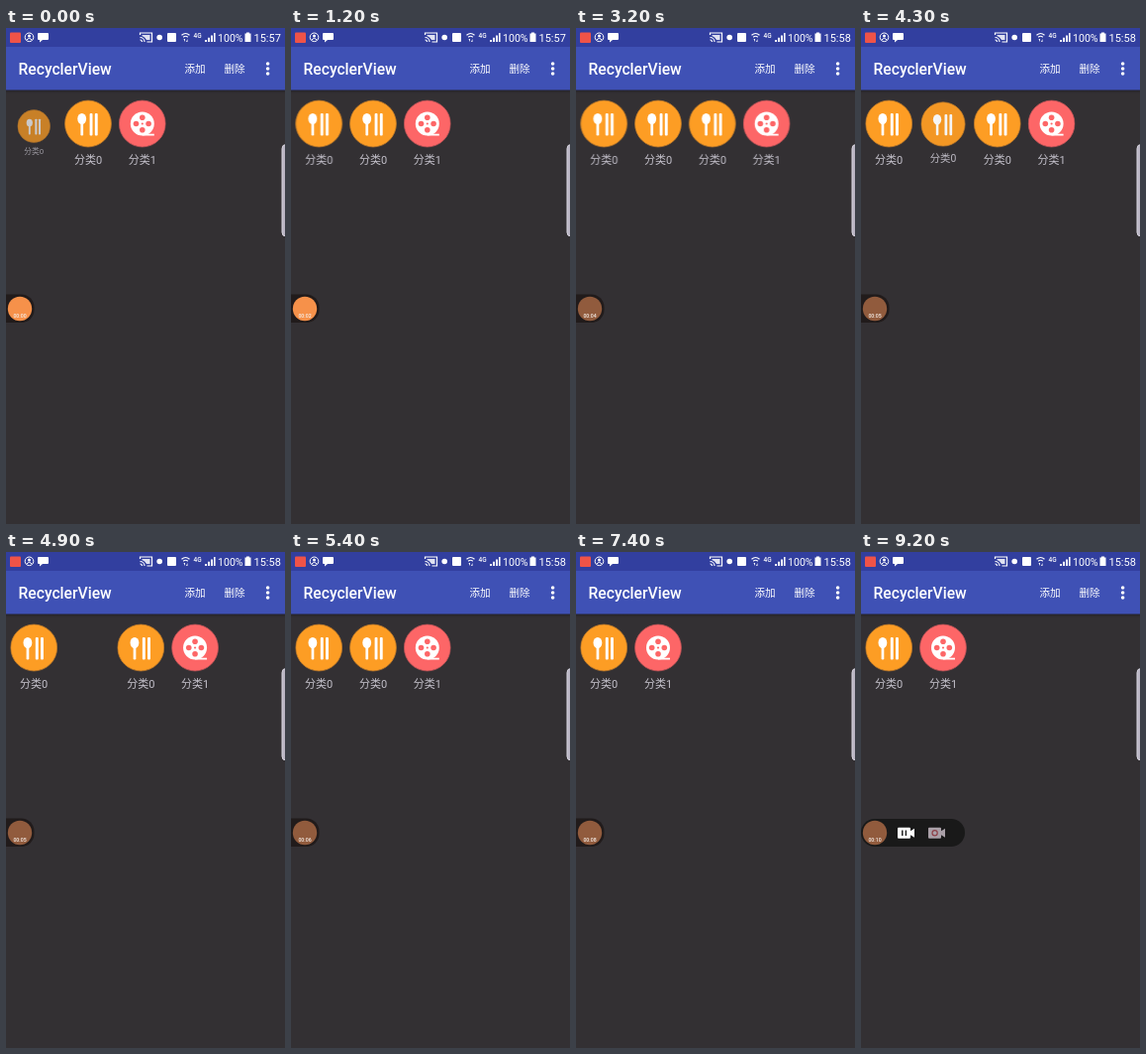
Recreate the animation shown at these times as an HTML page. Size 282x500 px, loop 9.3 s.

```html
<!DOCTYPE html>
<html lang="zh">
<head>
<meta charset="utf-8">
<title>RecyclerView</title>
<style>
  html, body { margin: 0; width: 100%; height: 100%; overflow: hidden; background: #333033; }
  svg { display: block; width: 100vw; height: 100vh; font-family: Roboto, "Noto Sans CJK SC", "Noto Sans CJK", sans-serif; }

  .anim { animation: 9300ms cubic-bezier(.37, 0, .63, 1) infinite; }
  .cut { animation: 9300ms step-end infinite; }
  .label { font-size: 11px; fill: #c4c1cb; text-anchor: middle; }

  /* Horizontal moves: one cell is 54.8 wide */
  .first { animation-name: first-move; }
  .second { animation-name: second-move; }
  .film { animation-name: film-move; }
  @keyframes first-move {
    0%, 22.69% { transform: translateX(0); }
    28.06%, 100% { transform: translateX(54.8px); }
  }
  @keyframes second-move {
    0%, 22.69% { transform: translateX(54.8px); }
    28.06%, 52.12% { transform: translateX(109.6px); }
    57.49%, 100% { transform: translateX(54.8px); }
  }
  @keyframes film-move {
    0%, 22.69% { transform: translateX(109.6px); }
    28.06%, 52.12% { transform: translateX(164.4px); }
    57.49%, 73.62% { transform: translateX(109.6px); }
    79%, 100% { transform: translateX(54.8px); }
  }

  /* Items growing in and shrinking away */
  .first-pop { animation-name: first-pop; }
  .second-pop { animation-name: second-pop; }
  .added-pop { animation-name: added-pop; }
  @keyframes first-pop {
    0% { transform: scale(.7); opacity: .74; animation-timing-function: ease-out; }
    2.04%, 45.4% { transform: scale(1); opacity: 1; }
    51%, 100% { transform: scale(0); opacity: .2; }
  }
  @keyframes second-pop {
    0%, 66.9% { transform: scale(1); opacity: 1; }
    72.5%, 100% { transform: scale(0); opacity: .2; }
  }
  @keyframes added-pop {
    0%, 28.28% { transform: scale(0); opacity: .2; }
    33.87%, 100% { transform: scale(1); opacity: 1; }
  }

  .dim { animation-name: dim; }
  .open { animation-name: open; }
  .closed { animation-name: closed; }
  @keyframes dim { 0% { fill: #f6914a; } 33.3%, 100% { fill: #915b3d; } }
  @keyframes open { 0% { opacity: 0; } 96.7%, 100% { opacity: 1; } }
  @keyframes closed { 0% { opacity: 1; } 96.7%, 100% { opacity: 0; } }
</style>
</head>
<body>
<svg viewBox="0 0 282 500" preserveAspectRatio="none">
  <defs>
    <linearGradient id="shade" x2="0" y2="1">
      <stop stop-color="#232128"/>
      <stop offset="1" stop-color="#333033"/>
    </linearGradient>
    <g id="food">
      <circle cy="-8.5" r="23.4" fill="#fd9d24" stroke="#c07c2a" stroke-width=".8"/>
      <g fill="#fff">
        <ellipse cx="-6.3" cy="-13.5" rx="4.4" ry="5.5"/>
        <rect x="-7.6" y="-10" width="2.7" height="13.5" rx="1.2"/>
        <rect x="1.6" y="-19" width="2.9" height="22.5" rx="1"/>
        <rect x="6.8" y="-19" width="2.9" height="22.5" rx="1"/>
      </g>
      <text class="label" y="32">分类0</text>
    </g>
    <g id="movie">
      <circle cy="-8.5" r="23.4" fill="#fd6667" stroke="#c05558" stroke-width=".8"/>
      <circle cy="-8.5" r="12" fill="#fff"/>
      <path d="M0 2.6H12" stroke="#fff" stroke-width="1.8"/>
      <g fill="#fd6667">
        <circle cy="-14.8" r="2.8"/>
        <circle cx="6.3" cy="-8.5" r="2.8"/>
        <circle cy="-2.2" r="2.8"/>
        <circle cx="-6.3" cy="-8.5" r="2.8"/>
        <circle cy="-8.5" r="1.1"/>
      </g>
      <text class="label" y="32">分类1</text>
    </g>
    <path id="camera" d="M1 0H12a1 1 0 0 1 1 1V3.5L17 1V10L13 7.5V10a1 1 0 0 1-1 1H1a1 1 0 0 1-1-1V1a1 1 0 0 1 1-1z"/>
  </defs>

  <rect width="282" height="500" fill="#333033"/>
  <rect y="62" width="282" height="4" fill="url(#shade)"/>
  <rect y="18" width="282" height="44.5" fill="#3f51b5"/>
  <rect width="282" height="19" fill="#323f9f"/>

  <!-- Status bar -->
  <rect x="4" y="4.5" width="11" height="10.5" rx="1" fill="#ef5348"/>
  <g fill="none" stroke="#fff">
    <circle cx="23.5" cy="9.3" r="4.3"/>
    <path d="M20.8 12.3Q23.5 8.5 26.2 12.3"/>
    <path d="M135.5 7V5H147.5V14H142.5M135.5 9.5a4.5 4.5 0 0 1 4.5 4.5M135.5 12a2 2 0 0 1 2 2" stroke-width="1.2"/>
    <path d="M177.5 7.2Q181.5 3.8 185.5 7.2M179.2 9.2Q181.5 7.3 183.8 9.2" stroke-width="1.2"/>
  </g>
  <g fill="#fff">
    <circle cx="23.5" cy="8" r="1.5"/>
    <path d="M33 5H42a1 1 0 0 1 1 1V11a1 1 0 0 1-1 1H37L34 14.5V12H33a1 1 0 0 1-1-1V6a1 1 0 0 1 1-1z"/>
    <path d="M137.5 7H145.5V12H142Q140.5 9 137.5 8z" opacity=".85"/>
    <circle cx="155.2" cy="9.5" r="2.8"/>
    <rect x="163" y="5" width="9" height="9" rx="1"/>
    <path d="M179.5 11H181V14zM182 14L183.5 11V14z"/>
    <path d="M201 12H203V14H201zM204 9.8H206V14H204zM207 7.4H209V14H207zM210 5H211.6V14H210z"/>
    <path d="M243 4.5H246V5.5H247.5V14H241.5V5.5H243z"/>
    <text x="189.5" y="9.5" font-size="6.5" font-weight="500">4G</text>
    <text x="214" y="13.5" font-size="10.6">100%</text>
    <text id="clock" x="250.5" y="13.5" font-size="11">15:57</text>
  </g>

  <!-- App bar -->
  <g fill="#fff">
    <text x="12.5" y="46.8" font-size="15.67" font-weight="500">RecyclerView</text>
    <text x="180.4" y="44.9" font-size="10.6">添加</text>
    <text x="220.4" y="44.9" font-size="10.6">删除</text>
    <circle cx="264.6" cy="36" r="1.8"/>
    <circle cx="264.6" cy="41" r="1.8"/>
    <circle cx="264.6" cy="46" r="1.8"/>
  </g>

  <!-- List -->
  <g transform="translate(28.2 105)">
    <g class="anim first"><g class="anim first-pop"><use href="#food"/></g></g>
    <g class="anim second"><g class="anim second-pop"><use href="#food"/></g></g>
    <g class="anim added-pop"><use href="#food"/></g>
    <g class="anim film"><use href="#movie"/></g>
  </g>

  <rect x="279" y="117.5" width="10" height="92.5" rx="4" fill="#bab5c4" stroke="#d6d3de"/>

  <!-- Recorder bubble -->
  <rect class="cut closed" x="-14" y="268.5" width="42.5" height="28.5" rx="13" fill="#211b1b"/>
  <g class="cut open">
    <rect x="0" y="269" width="105" height="28" rx="14" fill="#191919"/>
    <use href="#camera" x="37" y="277.7" fill="#fff"/>
    <path d="M41.8 280.5V286M45.4 280.5V286" stroke="#222" stroke-width="1.5"/>
    <use href="#camera" x="68" y="277.7" fill="#aaa0a8"/>
    <circle cx="74.6" cy="283.2" r="2.6" fill="none" stroke="#8e4048" stroke-width="1.2"/>
  </g>
  <circle class="cut dim" cx="14" cy="283" r="12.2" fill="#f6914a"/>
  <text id="timer" x="14" y="292.2" text-anchor="middle" font-size="5.2" font-weight="500" fill="#f4ece6">00:01</text>
</svg>
<script>
  const LOOP = 9300, CLOCK_CHANGE = 1300, FIRST_TICK = 1150, TICK = 975;
  const clock = document.getElementById('clock');
  const timer = document.getElementById('timer');
  const motion = document.querySelector('.film').getAnimations()[0];

  function setText(node, text) {
    if (node.textContent !== text) node.textContent = text;
  }

  function draw() {
    const t = (motion.currentTime || 0) % LOOP;
    const seconds = 2 + Math.floor((t - FIRST_TICK) / TICK);
    setText(clock, t < CLOCK_CHANGE ? '15:57' : '15:58');
    setText(timer, '00:' + String(Math.max(0, seconds)).padStart(2, '0'));
    requestAnimationFrame(draw);
  }
  draw();
</script>
</body>
</html>
```
